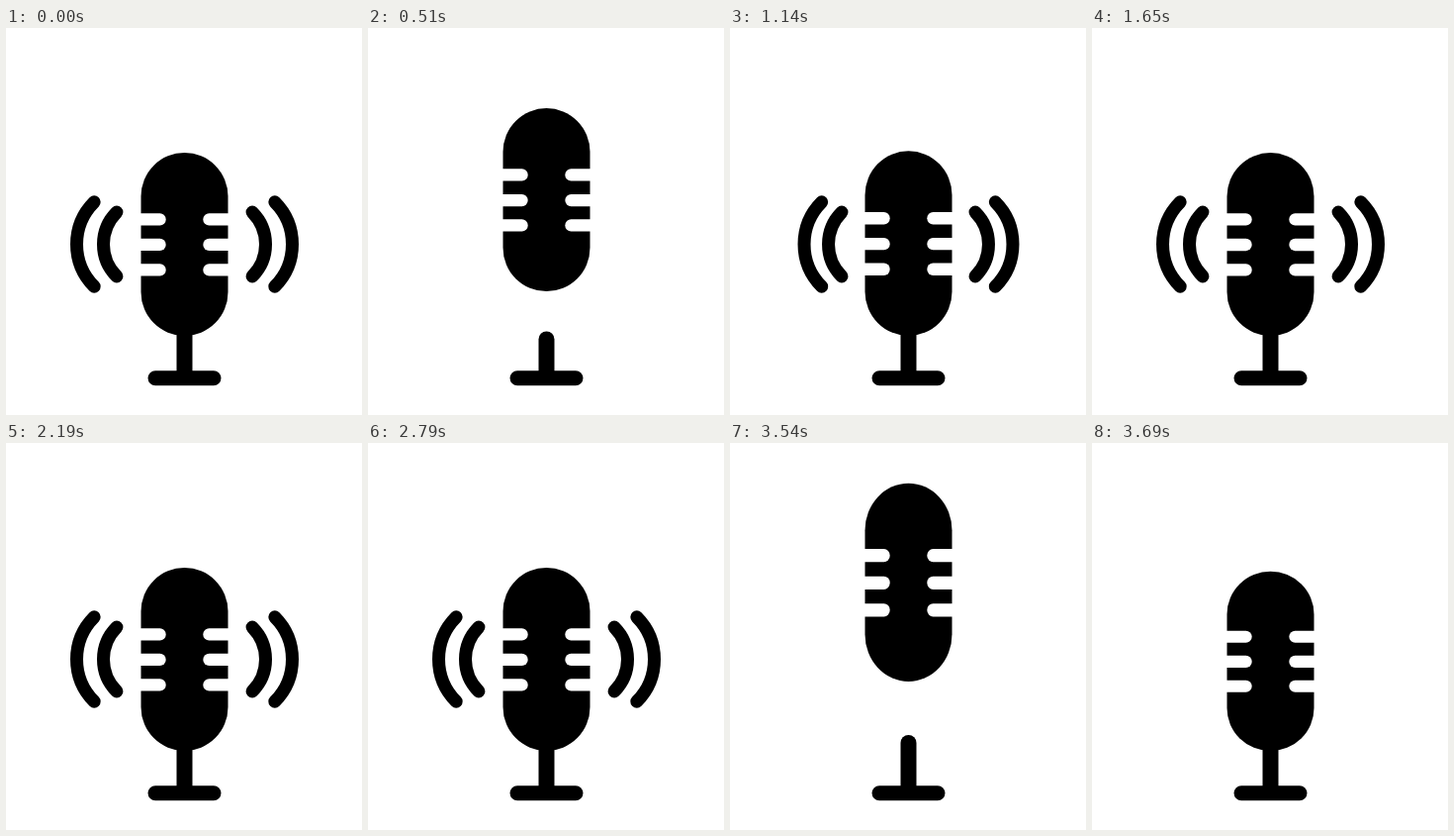
An HTML page with a canvas for the animation above (3720 ms loop, 360 by 391 pixels).

```html
<!DOCTYPE html>
<html lang="en">
<head>
<meta charset="utf-8">
<title>Microphone</title>
<style>
  html, body { margin: 0; width: 100%; height: 100%; overflow: hidden; background: #fff; }
  canvas { display: block; }
</style>
</head>
<body>
<canvas id="stage" width="360" height="391"></canvas>
<script>
const ctx = document.getElementById('stage').getContext('2d');
const LOOP = 3720, STEP = 30;
const CUT = 220;              // picture goes blank
const START = 433;            // microphone pops up
const REPEAT = 2745;          // the same sequence begins again after this long
const APEX = 700, FOOT_LAND = 898, HEAD_LAND = 932;
const CX = 180.5, TOP = 126, BOTTOM = 311, JUMP = 91;

const clamp = x => Math.max(0, Math.min(1, x));
const progress = (t, from, to) => clamp((t - from) / (to - from));

function line(x1, y1, x2, y2, width) {
  ctx.lineWidth = width;
  ctx.beginPath();
  ctx.moveTo(x1, y1);
  ctx.lineTo(x2, y2);
  ctx.stroke();
}

function pill(x, y, w, h, r) {
  ctx.beginPath();
  ctx.roundRect(x, y, w, h, r);
  ctx.fill();
}

function drawStand(t) {
  const base = progress(t, START, START + 71);
  const stem = progress(t, START, START + 105);
  line(151, 353.8, 151 + 59 * base, 353.8, 15);
  line(CX, 350, CX, 346 - 43 * stem, 16);
}

// Jump up, fall with a stretch, then wobble on the stand.
function bodyEdges(t) {
  if (t < APEX) {
    const left = 1 - progress(t, START, APEX);
    const lift = JUMP * (1 - left * left);
    return [TOP - lift, BOTTOM - lift];
  }
  const bottom = BOTTOM - JUMP * (1 - progress(t, APEX, FOOT_LAND) ** 2);
  if (t < HEAD_LAND) {
    return [TOP - JUMP * (1 - progress(t, APEX, HEAD_LAND) ** 3.1), bottom];
  }
  const s = t - HEAD_LAND;
  return [TOP + 12 * Math.exp(-s / 150) * Math.sin(Math.PI * s / 115), bottom];
}

function drawBody(t) {
  const [top, bottom] = bodyEdges(t);
  ctx.save();
  ctx.translate(0, top);
  ctx.scale(1, (bottom - top) / (BOTTOM - TOP));
  ctx.fillStyle = '#000';
  pill(136.5, 0, 88, 185, 44);
  ctx.fillStyle = '#fff';
  for (const y of [61.2, 86.8, 112.2]) {
    pill(120, y, 41.7, 12.3, 6.1);
    pill(199.3, y, 41.7, 12.3, 6.1);
  }
  ctx.restore();
}

// A pair of arcs that opens from its middle and slides outwards.
function drawWaves(t, start, reach, radius, offset, decay) {
  if (t < start) return;
  const shift = offset * Math.exp(-(t - start) / decay);
  const half = 0.785 * (0.4 + 0.6 * progress(t, start, start + 90));
  const dx = reach - radius - shift;
  ctx.lineWidth = 13;
  for (const side of [-1, 1]) {
    const mid = side < 0 ? Math.PI : 0;
    ctx.beginPath();
    ctx.arc(CX + side * dx, 218.5, radius, mid - half, mid + half);
    ctx.stroke();
  }
}

function draw(now) {
  let t = Math.floor(now % LOOP / STEP) * STEP;
  if (t >= CUT + REPEAT) t -= REPEAT;
  else if (t < CUT) t += REPEAT;

  ctx.fillStyle = '#fff';
  ctx.fillRect(0, 0, 360, 391);
  if (t >= START) {
    ctx.strokeStyle = '#000';
    ctx.lineCap = 'round';
    drawStand(t);
    drawBody(t);
    drawWaves(t, 950, 82, 45.9, 9, 88);
    drawWaves(t, 985, 109, 60.4, 18, 95);
  }
  requestAnimationFrame(draw);
}

requestAnimationFrame(draw);
</script>
</body>
</html>
```
